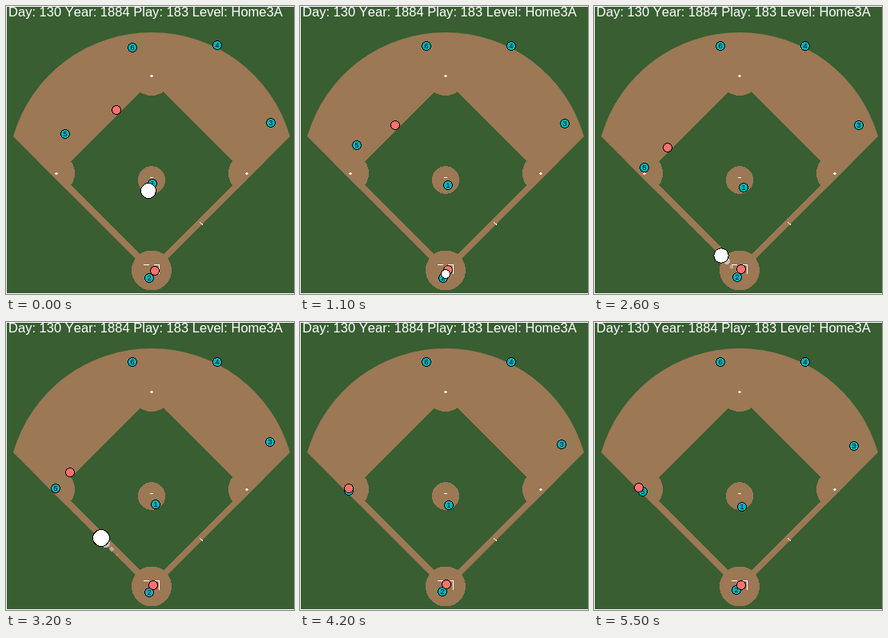
Recreate the animation shown at these times as an HTML page. Size 360 px wide and 360 px high, loop 5600 ms.

```html
<!DOCTYPE html>
<html lang="en">
<head>
<meta charset="utf-8">
<title>Baseball play</title>
<style>
  html, body { margin: 0; width: 100%; height: 100%; overflow: hidden; background: #385e32; }
  svg { display: block; width: 360px; height: 360px; shape-rendering: crispEdges; }
  text { font-family: "Liberation Sans", Arial, sans-serif; }
  .title { font-size: 16.55px; fill: #fff; font-kerning: none; }
  .num { font-size: 9px; text-anchor: middle; fill: #000; }
  .dirt { fill: #9c7854; }
  .grass { fill: #385e32; }
  .chalk { fill: none; stroke: #fff; stroke-width: 1; }
</style>
</head>
<body>
<svg viewBox="0 0 360 360">
  <defs>
    <clipPath id="fair"><path d="M9 163A180.1 180.1 0 0 1 355 163L182 336Z"/></clipPath>
  </defs>
  <rect width="360" height="360" fill="#fff"/>
  <rect class="grass" x="1" y="1" width="359" height="358"/>
  <g clip-path="url(#fair)">
    <rect class="dirt" width="360" height="360"/>
    <path class="grass" d="M66 209L182 93L298 209L182 325Z"/>
    <circle class="dirt" cx="61" cy="209" r="25"/>
    <circle class="dirt" cx="182" cy="87" r="25"/>
    <circle class="dirt" cx="303" cy="209" r="25"/>
  </g>
  <circle class="dirt" cx="182" cy="330.5" r="25"/>
  <circle class="dirt" cx="182" cy="217.5" r="17.3"/>
  <path fill="#fff" d="M182 85.5l2 2-2 2-2-2zM63 207.5l2 2-2 2-2-2zM301 207.5l2 2-2 2-2-2z"/>
  <path class="chalk" d="M180 214.5h4M172 323.5h7M185 323.5h6.5v11M242 270l4 3.5"/>
  <text class="title" x="3" y="13">Day: 130 Year: 1884 Play: 183 Level: Home3A</text>
  <g id="men"></g>
  <g id="balls"></g>
</svg>
<script>
const LOOP = 5600, STEP = 100;
const TEAL = '#00b5be', RED = '#ff706e';
const THROW_START = 2300, THROW_END = 4100;

const mix = (a, b, u) => a + (b - a) * u;

// Progress functions: 0 to 1 over time
const span = (t0, t1, power = 1) =>
  t => Math.min(1, Math.max(0, (t - t0) / (t1 - t0))) ** power;
const settle = time => t => 1 - Math.exp(-((t / time) ** 2));

// A start point plus moves, each [dx, dy, progress]
const walk = (x, y, ...moves) => t => moves.reduce(
  ([px, py], [dx, dy, u]) => [px + dx * u(t), py + dy * u(t)], [x, y]);

const players = [
  ['1', TEAL, walk(183, 222, [4, 5, span(0, 2600)], [-2, 4, span(2600, 5300)])],
  ['2', TEAL, walk(179, 340, [-1, -5, span(0, 5300, 2)])],
  ['3', TEAL, walk(331, 146, [0, 3, span(0, 2600)], [-6, 6, span(2600, 5300)])],
  ['4', TEAL, walk(264, 49, [0, 1, span(0, 600)])],
  ['5', TEAL, walk(74, 160, [-13, 52, settle(2000)])],
  ['6', TEAL, walk(158, 52, [0, -2, span(0, 1200)])],
  ['', RED, walk(138, 130, [-77, 78, span(0, 4200, 1.06)], [-5, -1, span(4200, 5300)])],
  ['', RED, walk(186, 331, [-3, -3, span(0, 4200)], [1, 1, span(4200, 5500)])]
];

const pitch = span(0, 880);
const toss = span(THROW_START, THROW_END);

// Ball centre and radius; the radius grows with height
function ballAt(t) {
  if (t < 0 || t > THROW_END) return null;
  if (t < THROW_START) {
    const u = pitch(t);
    return [mix(178, 182, u), mix(231, 335, u), mix(9.5, 5.5, u)];
  }
  const u = toss(t);
  return [mix(179, 58.5, u), mix(333, 207, u), 7.5 + 12 * u * (1 - u)];
}

function add(parent, tag, attrs) {
  const el = document.createElementNS('http://www.w3.org/2000/svg', tag);
  for (const k in attrs) el.setAttribute(k, attrs[k]);
  return parent.appendChild(el);
}

const men = players.map(([label, fill, path]) => {
  const g = add(document.getElementById('men'), 'g', {});
  add(g, 'circle', { r: 5.5, fill, stroke: '#000' });
  add(g, 'text', { class: 'num', y: 3.2 }).textContent = label;
  return { g, path };
});

const layer = document.getElementById('balls');
const trail = [3, 2, 1].map(n => ({
  n, el: add(layer, 'circle', { fill: '#d4d4d4', opacity: 1.05 - 0.25 * n })
}));
const ball = add(layer, 'circle', { fill: '#fff', stroke: '#000' });

function place(el, pos, scale) {
  el.setAttribute('visibility', pos ? 'visible' : 'hidden');
  if (!pos) return;
  el.setAttribute('cx', Math.round(pos[0]));
  el.setAttribute('cy', Math.round(pos[1]));
  el.setAttribute('r', pos[2] * scale);
}

function draw(t) {
  for (const { g, path } of men) {
    const [x, y] = path(t).map(Math.round);
    g.setAttribute('transform', `translate(${x} ${y})`);
  }
  const now = ballAt(t);
  place(ball, now, 1);
  for (const { n, el } of trail) {
    const past = ballAt(t - n * STEP);
    const moved = now && past && Math.hypot(now[0] - past[0], now[1] - past[1]) > 1;
    place(el, moved ? past : null, 0.5 ** n);
  }
}

const start = performance.now();
function tick() {
  const t = (performance.now() - start) % LOOP;
  draw(Math.floor(t / STEP) * STEP);
  requestAnimationFrame(tick);
}
tick();
</script>
</body>
</html>
```
